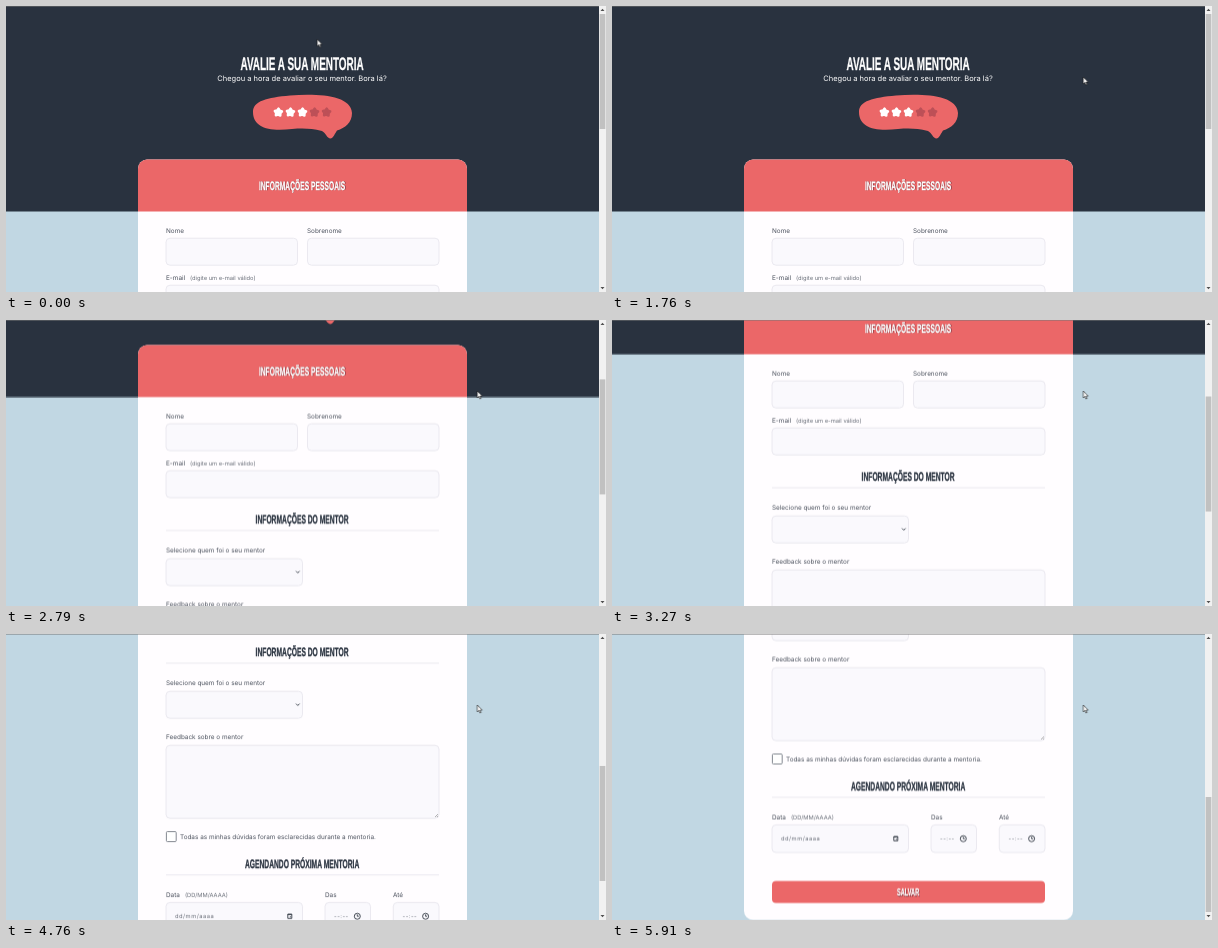
An HTML page that plays this animation: 600 px wide and 286 px high, repeating every 6330 ms.

```html
<!DOCTYPE html>
<html lang="pt-BR">
<head>
<meta charset="utf-8">
<title>Avalie a sua mentoria</title>
<style>
  html, body { margin: 0; width: 100%; height: 100%; overflow: hidden; background: #c1d7e3; }
  svg { display: block; width: 600px; height: 286px; }
  text { font-family: Inter, "Open Sans", sans-serif; font-size: 6.4px; fill: #4a505c; text-rendering: geometricPrecision; }
  .head { font-family: "Liberation Sans", Arial, sans-serif; font-weight: 700; text-anchor: middle; stroke-width: .35; }
  .hint { font-size: 5.75px; fill: #6b707a; }
  .sub { font-size: 7.5px; fill: #fff; text-anchor: middle; }
  .field { fill: #faf9fd; stroke: #e6e5ec; stroke-width: .8; }
  .rule { stroke: #e6e5ec; stroke-width: .8; }
  .icon { fill: none; stroke: #333a45; stroke-width: .9; }
</style>
</head>
<body>
<svg viewBox="0 0 600 286" xmlns="http://www.w3.org/2000/svg">
  <g id="page">
    <rect width="593" height="205.5" fill="#29323f"/>
    <g id="title"></g>
    <text id="sub" class="sub" x="296" y="74.7">Chegou a hora de avaliar o seu mentor. Bora lá?</text>
    <path fill="#eb6768" d="M247 106C247 95 261 91.5 284 89.5C312 87.5 345 89 346 107C346 117 339 122 331 124.5C329 127.5 327 132.5 324.5 132.5C321 132.5 320 127 316 125C305 122.5 298 122 286 123C262 126 247 121 247 106Z"/>
    <g id="stars"></g>
    <rect x="132" y="153.5" width="329" height="520" rx="9" fill="#fffdff"/>
    <path d="M132 205.5V162.5a9 9 0 0 1 9-9H452a9 9 0 0 1 9 9V205.5Z" fill="#eb6768"/>
    <g id="form"></g>
  </g>
  <path d="M0 .5H593" stroke="#777" stroke-opacity=".5"/>
  <rect x="593" width="7" height="286" fill="#f1f1f1"/>
  <path d="M594.5 5L596.5 2.8 598.5 5ZM594.5 281L596.5 283.2 598.5 281Z" fill="#505050"/>
  <rect id="thumb" x="593.7" y="8" width="5.6" height="115" fill="#c1c1c1"/>
  <path id="cursor" d="M0 0V6.9L1.6 5.5 2.7 8 3.8 7.5 2.7 5.1H4.8Z" fill="#fff" stroke="#111" stroke-width=".6"/>
</svg>
<script>
const LOOP = 6330;
const INK = '#29323f', RED = '#eb6768', SHADE = '#8c3d46';
const $ = id => document.getElementById(id);

// ---- drawing helpers ----
const label = (x, y, s, cls = '') => `<text class="${cls}" x="${x}" y="${y}">${s}</text>`;
const field = (x, y, w, h) => `<rect class="field" x="${x}" y="${y}" width="${w}" height="${h}" rx="4"/>`;
const rule = y => `<path class="rule" d="M160 ${y}H433"/>`;

// condensed display face, one ratio for every heading
const head = (y, size, s, fill, shadow) => {
  const one = (d, c) => `<text class="head" transform="translate(${296.1 + d} ${y + d}) scale(.55 1)" style="font-size:${size}px;fill:${c};stroke:${c}">${s}</text>`;
  return (shadow ? one(.6, shadow) : '') + one(0, fill);
};

const clock = (x, y) =>
  `<circle class="icon" cx="${x}" cy="${y}" r="3"/><path class="icon" d="M${x} ${y - 1.8}V${y}H${x + 1.5}"/>`;

const star = (x, fill) => {
  const pts = Array.from({ length: 10 }, (_, i) => {
    const a = (i * 36 - 86) * Math.PI / 180, r = i % 2 ? 2.3 : 3.8;
    return `${(x + r * Math.cos(a)).toFixed(2)},${(106.4 + r * Math.sin(a)).toFixed(2)}`;
  });
  return `<polygon points="${pts.join(' ')}" fill="${fill}" stroke="${fill}" stroke-width="2.4" stroke-linejoin="round"/>`;
};

// ---- page content ----
$('title').innerHTML = head(63.5, 18.1, 'AVALIE A SUA MENTORIA', '#fff');
$('stars').innerHTML = [0, 1, 2, 3, 4]
  .map(i => star(272.3 + i * 12.05, i < 3 ? '#fff' : '#bd5057')).join('');

$('form').innerHTML = [
  head(183.8, 12.2, 'INFORMAÇÕES PESSOAIS', '#fff', SHADE),
  label(160, 226.6, 'Nome'), field(160, 232.2, 131.5, 27),
  label(301, 226.6, 'Sobrenome'), field(301.5, 232.2, 131.5, 27),
  label(160, 273.8, 'E-mail'), label(184, 273.8, '(digite um e-mail válido)', 'hint'),
  field(160, 279.2, 273, 27),

  head(332, 12.2, 'INFORMAÇÕES DO MENTOR', INK), rule(339),
  label(160, 360.8, 'Selecione quem foi o seu mentor'), field(160, 367.2, 136.5, 27),
  '<path class="icon" d="M290 379.6L291.8 381.4 293.6 379.6"/>',
  label(160, 415.4, 'Feedback sobre o mentor'), field(160, 421.2, 273, 73),
  '<path d="M429 493L432 490M431 493L432 492" stroke="#777" stroke-width=".6"/>',
  '<rect x="160.4" y="507.5" width="9.8" height="10" rx="1" fill="#fff" stroke="#777c85" stroke-width=".9"/>',
  label(174, 515.1, 'Todas as minhas dúvidas foram esclarecidas durante a mentoria.'),

  head(544, 12.2, 'AGENDANDO PRÓXIMA MENTORIA', INK), rule(550.8),
  label(160, 572.9, 'Data'), label(179, 572.8, '(DD/MM/AAAA)', 'hint'),
  label(319, 572.9, 'Das'), label(387, 572.9, 'Até'),
  field(160, 578.4, 136.5, 27.6), field(319, 578.4, 45.5, 27.6), field(387.3, 578.4, 45.7, 27.6),
  '<g letter-spacing=".5">', label(169, 594.1, 'dd/mm/aaaa', 'hint'),
  label(328, 594.1, '--:--', 'hint'), label(396.5, 594.1, '--:--', 'hint'), '</g>',
  '<path class="icon" d="M281.8 590V594.3H285.8V590ZM281.8 590.5H285.8M283.8 592.8H285"/>',
  clock(351.3, 592.2), clock(419.6, 592.2),

  `<rect x="160" y="634.5" width="273" height="22" rx="4" fill="${RED}"/>`,
  head(649.2, 10.2, 'SALVAR', '#fff', SHADE)
].join('');

// ---- motion: rows of [ms, properties, easing to the next row] ----
const play = (id, rows) => $(id).animate(
  rows.map(([ms, props, easing = 'linear']) => ({ offset: ms / LOOP, easing, ...props })),
  { duration: LOOP, iterations: Infinity });
const move = (x, y) => ({ transform: `translate(${x}px, ${y}px)` });

// wheel clicks: [start, end, scroll position after it]
const clicks = [
  [1980, 2210, 42.8], [2290, 2530, 85.6], [2560, 2780, 128.5], [2940, 3240, 171.3], [3850, 4090, 214.1],
  [4340, 4520, 257], [4520, 4700, 299.8], [4700, 4880, 342], [5360, 5570, 384], [5570, 5770, 387.5]
];
const scroll = (id, ratio) => {
  let y = 0;
  const rows = [[0, move(0, 0)]];
  for (const [start, end, to] of clicks) {
    rows.push([start, move(0, y * ratio), 'ease-in-out']);
    y = to;
    rows.push([end, move(0, y * ratio)]);
  }
  rows.push([LOOP, move(0, y * ratio)]);
  play(id, rows);
};
scroll('page', -1);
scroll('thumb', .4);

// texts vanish on reload, then slide in
const enter = (id, dy) => {
  const shown = { ...move(0, 0), opacity: 1 }, hidden = { ...move(0, dy), opacity: 0 };
  play(id, [[0, shown], [610, shown], [610, hidden], [650, hidden, 'ease'], [1250, shown], [LOOP, shown]]);
};
enter('title', -57);
enter('sub', 8);

play('cursor', [
  [0, move(311.2, 33.3)], [30, move(311.2, 33.3), 'ease-in-out'],
  [630, move(466.2, 69.7)], [1340, move(466.2, 69.7), 'ease-in-out'],
  [1640, move(471.3, 71)], [LOOP, move(471.3, 71)]
]);
</script>
</body>
</html>
```
